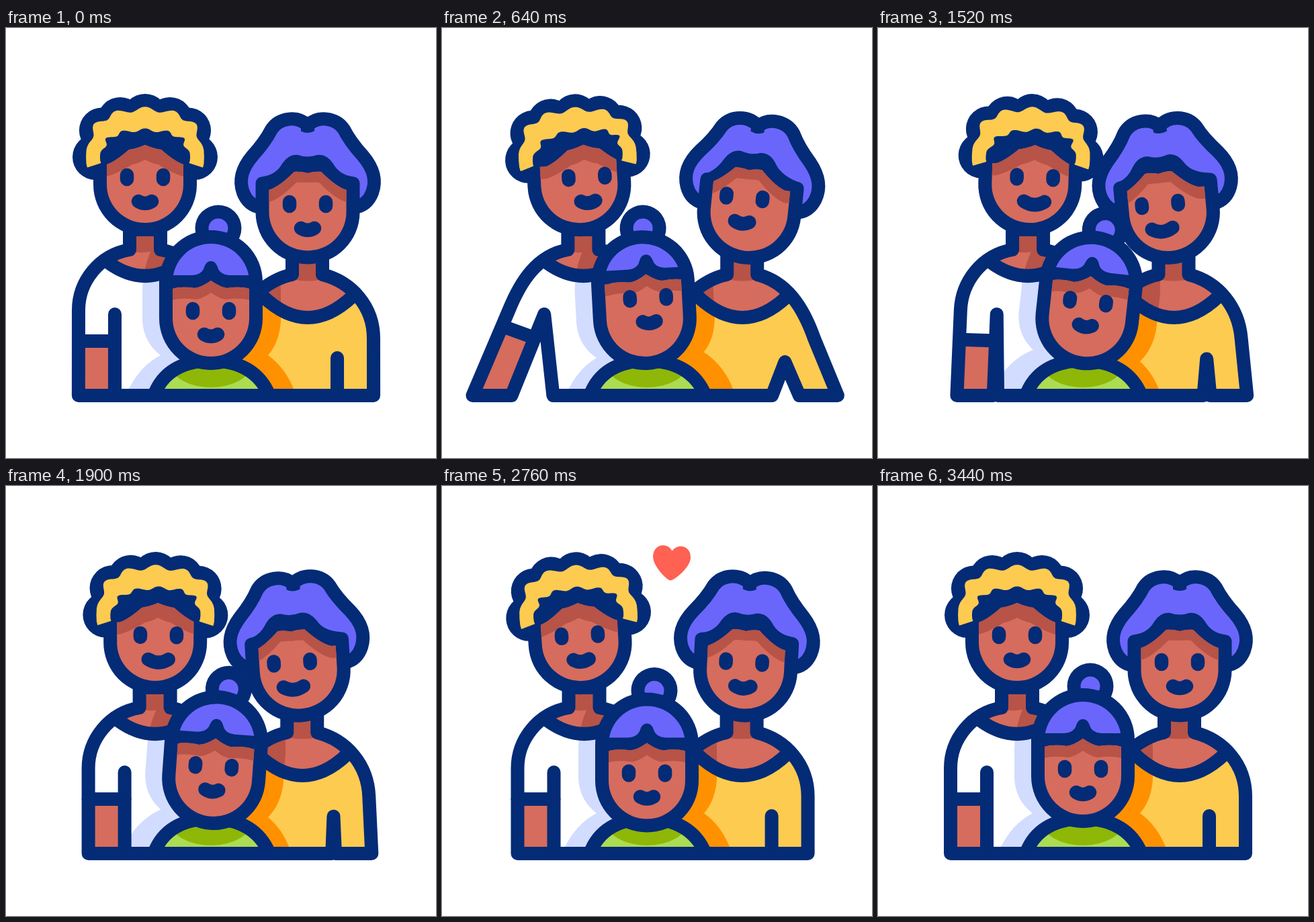
Animation of 640 by 640 pixels, one loop 3600 ms. Source, as an HTML page with a canvas:

```html
<!DOCTYPE html>
<html lang="en">
<head>
<meta charset="utf-8">
<title>Family</title>
<style>
html, body { margin: 0; height: 100%; overflow: hidden; background: #fff; }
canvas { display: block; }
</style>
</head>
<body>
<canvas id="stage" width="640" height="640"></canvas>
<script>
const ctx = document.getElementById('stage').getContext('2d');
const LOOP = 3600;
const NAVY = '#042b76', SKIN = '#d66c5d', SKIN_DARK = '#b75347', YELLOW = '#fdcb50', PURPLE = '#6a66fb';

// Rises from 0 to 1 between two times.
const ramp = (t, from, to) => Math.min(1, Math.max(0, (t - from) / (to - from)));
// Rises, stays at 1, then falls back to 0.
const pulse = (t, a, b, c, d) => ramp(t, a, b) - ramp(t, c, d);

// The adults spread their arms, lean in, then part; the girl looks up left, then right.
function poseAt(t) {
  const spread = pulse(t, 0, 580, 580, 1620);
  const hug = pulse(t, 580, 1620, 1620, 2640);
  const part = pulse(t, 1620, 2640, 2640, 2980);
  const left = pulse(t, 0, 580, 1000, 1620);
  const right = pulse(t, 1000, 1620, 1620, 2200);
  return {
    shift: 2.5 * spread + 17.5 * hug + 7 * part,
    smile: spread + 12 * hug + 5 * part,
    man: { tilt: -3.9 * spread + 2.5 * hug - 5.4 * part, look: 12 * spread + 6.5 * hug, arm: 70 * spread },
    woman: {
      tilt: 6.7 * (spread - hug) + 4.6 * part,
      look: -9 * spread - 10.7 * hug - 4 * part,
      nod: -10 * spread,
      arm: 46 * spread + 7 * hug
    },
    girl: {
      tilt: -3.1 * left + 8 * right,
      look: 6.5 * left - 3 * right,
      nod: -19 * left - 13 * right,
      drop: 6.5 * pulse(t, 1620, 2260, 2900, 3440)
    }
  };
}

function paint(d, fill, width) {
  const path = new Path2D(d);
  if (fill) { ctx.fillStyle = fill; ctx.fill(path); }
  if (width) { ctx.lineWidth = width; ctx.stroke(path); }
}

function dot(x, y, r, color) {
  ctx.fillStyle = color;
  ctx.beginPath();
  ctx.arc(x, y, r, 0, 7);
  ctx.fill();
}

function group(draw) {
  ctx.save();
  draw();
  ctx.restore();
}

function tilt(x, y, degrees) {
  ctx.translate(x, y);
  ctx.rotate(degrees * Math.PI / 180);
  ctx.translate(-x, -y);
}

const capsule = (r, top, cy) => `M${-r} ${top}V${cy}A${r} ${r} 0 0 0 ${r} ${cy}V${top}Z`;

// Left half of a hairline: level at the side, up to the fringe corner, then to the middle.
function hairline(side, sideY, cornerX, cornerY, midY) {
  const bend = (side + cornerX) / 2 + 4;
  return `${sideY}H${-side}Q${-bend} ${sideY - 4} ${-cornerX} ${cornerY}Q${-cornerX * 0.6} ${cornerY - 1} 0 ${midY}` +
    `Q${cornerX * 0.6} ${cornerY - 1} ${cornerX} ${cornerY}Q${bend} ${sideY - 4} ${side} ${sideY}H90`;
}

const MAN = { r: 57, cy: 233, eyes: 222, mouth: 259, fringe: hairline(57, 203, 24, 181, 174), shade: hairline(57, 221, 19, 203, 196) };
const WOMAN = { r: 57.5, cy: 274, eyes: 262, mouth: 299, fringe: hairline(58, 241, 20, 214, 216), shade: hairline(58, 259, 17, 230, 230) };
const GIRL = { r: 57, cy: 432, eyes: 421, mouth: 457, fringe: hairline(57, 388, 24, 387, 376), shade: hairline(57, 405, 22, 404, 394) };
const GIRL_SHADOW = 'M203 436V392A103 125 0 0 1 409 392V436Q407 468 390 487Q415 505 428 537L440 575H170L183 537' +
  'Q200 503 230 487Q205 468 203 436Z';

// Skin below the fringe, its shade, eyes and mouth; x = 0 is the middle of the head.
function face({ r, cy, eyes, mouth, fringe, shade }, lookX, lookY, smile) {
  group(() => {
    ctx.clip(new Path2D(capsule(r, 150, cy)));
    ctx.translate(lookX * 0.8, lookY / 2);
    ctx.clip(new Path2D(`M-90 ${fringe}V600H-90Z`));
    paint('M-150 100H150V600H-150Z', SKIN);
    paint(`M-90 ${shade}V100H-90Z`, SKIN_DARK);
  });
  group(() => {
    ctx.translate(lookX, lookY);
    for (const x of [-27, 27]) paint(`M${x} ${eyes - 3}v6`, null, 20.5);
    const w = 10 + smile / 2, sag = 6 + smile / 3;
    paint(`M${-w} ${mouth - 1}Q0 ${mouth - 1 + sag} ${w} ${mouth - 1}`, null, 20.5);
  });
}

// Fills a body part and the girl's shadow on it.
function shaded(d, color, shadeColor, originX, girl) {
  paint(d, color);
  group(() => {
    ctx.clip(new Path2D(d));
    ctx.translate(-originX, 0);
    tilt(305, 490, girl.tilt);
    paint(GIRL_SHADOW, shadeColor);
  });
}

// A point on the arch of curls; the angle is counted from the top.
function arch(degrees, rx, ry) {
  const a = degrees * Math.PI / 180, c = Math.cos(a);
  return [rx * Math.sin(a), 192 - ry * Math.sign(c) * Math.abs(c) ** 0.6];
}

function curls(look) {
  const edge = [];
  for (let a = -94; a <= 94; a += 2) {
    const wave = Math.cos(a * Math.PI / 15), out = 1 + 0.05 * wave, inn = 1 + 0.06 * wave;
    const [x, y] = arch(a, 64 * inn, 41 * inn);
    edge.push(arch(a, 83 * out, 70.5 * out));
    edge.unshift([x + look * Math.cos(a * Math.PI / 180), y]);
  }
  ctx.strokeStyle = YELLOW;
  paint('M' + edge.join('L') + 'Z', YELLOW, 1.5);
  ctx.strokeStyle = NAVY;
}

function man({ man: { tilt: lean, look, arm: s }, shift, smile, girl }) {
  const x = 207 + shift;
  ctx.translate(x, 0);
  const body = `M99 547H-45L${-45 - 0.2 * s} 426L${-45 - 0.94 * s} 547H${-99 - s}L${-99 - 0.18 * s} 420` +
    `C${-99 + 0.08 * s} 378 -69 338 -23 330V300H23V330C69 338 99 378 99 420Z`;
  const collar = 'M-55 349Q0 389 55 349';
  const cuff = `M${-99 - 0.31 * s} ${466 - 0.33 * s}L${-45 - 0.44 * s} ${466 - 0.08 * s}`;
  shaded(body, '#fff', '#d2dcfe', x, girl);
  shaded(collar + 'L23 330V300H-23V330Z', SKIN, SKIN_DARK, x, girl);
  paint('M-23 290H23V328Q0 338 -23 332Z', SKIN_DARK);
  paint(`${cuff}L${-45 - 0.94 * s} 547H${-99 - s}Z`, SKIN);
  paint(cuff, null, 20);
  paint(collar, null, 20);
  paint(body, null, 20);

  tilt(0, 330, lean);
  for (let a = -90; a <= 90; a += 30) dot(...arch(a, 74, 60), 34, NAVY);
  paint(capsule(77, 150, 233), NAVY);
  curls(look);
  face(MAN, look, 0, smile);
}

function woman({ woman: { tilt: lean, look, nod, arm: s }, shift, smile, girl }) {
  const x = 449 - 0.53 * shift;
  ctx.translate(x, 0);
  const body = `M-109 547H44L${44 + 0.44 * s} ${491 + 0.14 * s}L${44 + 0.93 * s} 547H${98 + s}L${98 + 0.2 * s} 462` +
    `C${98 - 0.18 * s} 415 66 378 22 367V330H-23V367C-59 374 -104 410 -109 460Z`;
  const collar = 'M-66 400Q0 462 66 400';
  shaded(body, YELLOW, '#ff9100', x, girl);
  shaded(collar + 'L22 367V330H-23V367Z', SKIN, SKIN_DARK, x, girl);
  paint('M-23 335H22V374Q0 379 -23 374Z', SKIN_DARK);
  paint(collar, null, 20);
  paint(body, null, 20);

  tilt(0, 370, lean);
  for (const side of [-1, 1]) group(() => {
    ctx.scale(side, 1);
    paint('M0 145C15 130 42 133 54 151C62 167 72 179 82 190C98 209 103 226 96 245C91 258 82 265 70 267H0Z', PURPLE, 20);
  });
  paint('M-20 146Q0 166 20 146V200H-20Z', PURPLE);
  const g = look * 0.7, y = v => v + nod / 2;
  paint(`M-77.5 274V232Q-77.5 222 -66 221Q${-47 + g} ${y(218)} ${-38 + g} ${y(202)}Q${-28 + g} ${y(187)} ${-14 + g} ${y(189)}` +
    `Q${g} ${y(194)} ${14 + g} ${y(189)}Q${28 + g} ${y(187)} ${38 + g} ${y(202)}Q${47 + g} ${y(218)} 66 221` +
    'Q77.5 222 77.5 232V274A77.5 77.5 0 0 1 -77.5 274Z', NAVY);
  face(WOMAN, look, nod, smile);
}

function bun({ girl }) {
  ctx.translate(305, girl.drop);
  tilt(0, 490, girl.tilt);
  dot(11 - girl.look, 298, 34.5, NAVY);
  dot(11 - girl.look, 298, 14.5, PURPLE);
}

function girl({ girl: { tilt: lean, look, nod, drop } }) {
  ctx.translate(305, 0);
  const body = 'M-85 547Q-66 496 0 495Q66 496 87 547Z';
  paint(body, '#acdc51');
  group(() => {
    ctx.clip(new Path2D(body));
    paint('M-60 500A60 35 0 0 0 60 500Z', '#8fb707');
  });
  paint(body, null, 20);

  ctx.translate(0, drop);
  tilt(0, 490, lean);
  paint('M-77 378A77 77 0 0 1 77 378V432A77 77 0 0 1 -77 432Z', NAVY);
  face(GIRL, look, nod, 0);
  ctx.clip(new Path2D('M-57 378A57 57 0 0 1 57 378V400H-57Z'));
  ctx.translate(look, nod / 2);
  paint('M-90 250V368H-28Q-13 367 -10 356Q-7 347 0 347Q7 347 10 356Q13 367 28 368H90V250Z', PURPLE);
}

function heart(t) {
  const size = ramp(t, 2600, 2720);
  ctx.globalAlpha = 1 - ramp(t, 3060, 3300);
  ctx.translate(341.5, 121 - 69 * ramp(t, 2710, 3260));
  ctx.rotate(0.06);
  ctx.scale(size, size);
  paint('M0 26C-5 26 -28 6 -28 -9C-28 -27 -8 -31 0 -18C8 -31 28 -27 28 -9C28 6 5 26 0 26Z', '#ff6152');
}

function draw(now) {
  const t = now % LOOP, pose = poseAt(t);
  ctx.fillStyle = '#fff';
  ctx.fillRect(0, 0, 640, 640);
  ctx.strokeStyle = NAVY;
  ctx.lineCap = ctx.lineJoin = 'round';
  for (const part of [man, bun, woman, girl]) group(() => part(pose));
  if (t > 2600 && t < 3300) group(() => heart(t));
}

const start = performance.now();
function tick() {
  draw(performance.now() - start);
  requestAnimationFrame(tick);
}
tick();
</script>
</body>
</html>
```
